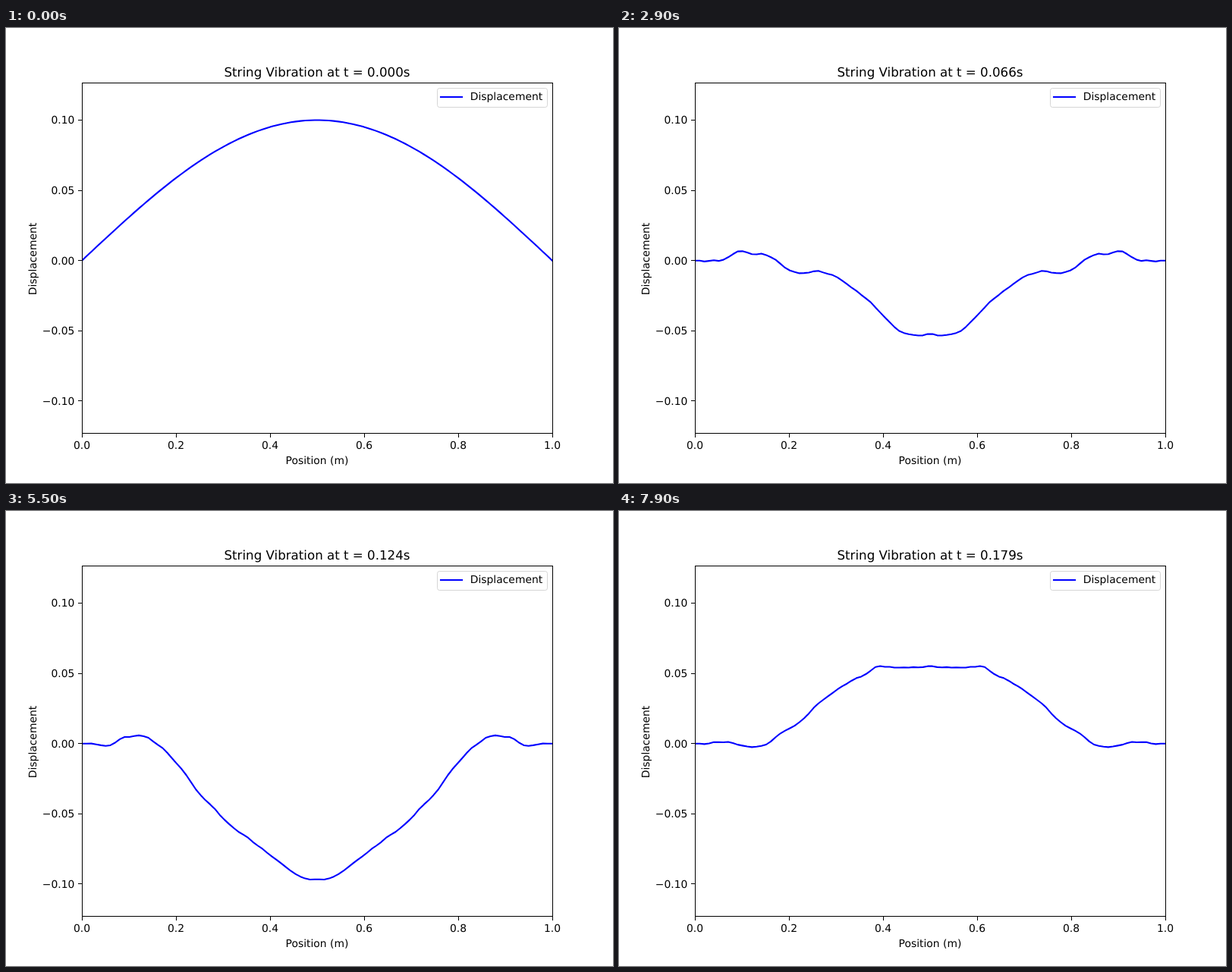
These frames come from a looping animation (800x600 px, 8000 ms). An HTML page:

```html
<!DOCTYPE html>
<html lang="en">
<head>
<meta charset="utf-8">
<title>String Vibration</title>
<style>
  html, body { margin: 0; width: 100%; height: 100%; overflow: hidden; background: #fff; }
  svg { display: block; width: 800px; height: 600px; }
  text { font: 13.889px "DejaVu Sans", sans-serif; fill: #000; text-rendering: geometricPrecision; }
  #title { font-size: 16.667px; }
  .mid { text-anchor: middle; }
  .end { text-anchor: end; }
  .axis { fill: none; stroke: #000; stroke-width: 1; }
  .line { fill: none; stroke: #00f; stroke-width: 2.083; stroke-linejoin: round; stroke-linecap: square; }
</style>
</head>
<body>
<svg viewBox="0 0 800 600">
  <clipPath id="plot"><rect x="100" y="72" width="620" height="462"/></clipPath>
  <path id="string" class="line" clip-path="url(#plot)"/>
  <g id="axes"><rect class="axis" x="100.5" y="72.5" width="620" height="462"/></g>
  <text id="title" class="mid" x="410" y="64"></text>
  <text class="mid" x="410" y="575">Position (m)</text>
  <text class="mid" transform="translate(40 304.5) rotate(-90)">Displacement</text>
  <rect x="568.5" y="79.5" width="145" height="25" rx="2.8" fill="#fff" fill-opacity=".8" stroke="#ccc" stroke-opacity=".8" stroke-width="1"/>
  <path class="line" d="M573 91H601"/>
  <text x="611.8" y="95">Displacement</text>
</svg>
<script>
const FRAMES = 80, FRAME_MS = 100;
const FRAME_DT = 0.0022615, SUBSTEPS = 100;
const POINTS = 100, STIFFNESS = 2.956, TENSION = -50.2, DAMPING = 1;
const toX = x => 100 + 620 * x;
const toY = u => 306.7 - 1852 * u;
const $ = id => document.getElementById(id);

function drawAxes() {
  let out = "";
  for (let i = 0; i <= 5; i++) {
    const x = toX(i / 5);
    out += `<path class="axis" d="M${x + 0.5} 535v5"/>` +
      `<text class="mid" x="${x}" y="555">${(i / 5).toFixed(1)}</text>`;
  }
  for (let i = -2; i <= 2; i++) {
    const y = toY(i / 20);
    const label = (i < 0 ? "\u2212" : "") + Math.abs(i / 20).toFixed(2);
    out += `<path class="axis" d="M100 ${Math.floor(y) + 0.5}h-5"/>` +
      `<text class="end" x="90.3" y="${Math.round(y) + 5}">${label}</text>`;
  }
  $("axes").insertAdjacentHTML("beforeend", out);
}

// Stiff string with clamped ends, explicit finite differences.
function simulate() {
  const h = 1 / (POINTS - 1), dt = FRAME_DT / SUBSTEPS;
  const bend = STIFFNESS * dt * dt / h ** 4;
  const pull = TENSION * dt * dt / h ** 2;
  const loss = DAMPING * dt;
  let u = Array.from({ length: POINTS }, (_, i) => 0.1 * Math.sin(Math.PI * i * h));
  const shapes = [u.slice()];
  u[1] = u[POINTS - 2] = u[POINTS - 1] = 0;
  let prev = u.slice();
  for (let step = 1; step <= (FRAMES - 1) * SUBSTEPS; step++) {
    const next = new Array(POINTS).fill(0);
    for (let i = 2; i < POINTS - 2; i++) {
      const near = u[i - 1] + u[i + 1];
      const d2 = near - 2 * u[i];
      const d4 = u[i - 2] + u[i + 2] - 4 * near + 6 * u[i];
      next[i] = (2 * u[i] - (1 - loss) * prev[i] + pull * d2 - bend * d4) / (1 + loss);
    }
    prev = u;
    u = next;
    if (step % SUBSTEPS === 0) shapes.push(u);
  }
  return shapes;
}

const toPath = shape => "M" + shape.map((u, i) =>
  `${toX(i / (POINTS - 1)).toFixed(2)} ${toY(u).toFixed(2)}`).join("L");

drawAxes();
const paths = simulate().map(toPath);

function render(ms) {
  const frame = Math.floor(ms / FRAME_MS) % FRAMES;
  $("string").setAttribute("d", paths[frame]);
  $("title").textContent = `String Vibration at t = ${(frame * FRAME_DT).toFixed(3)}s`;
}

const start = performance.now();
function tick() {
  render(performance.now() - start);
  requestAnimationFrame(tick);
}
tick();
</script>
</body>
</html>
```
